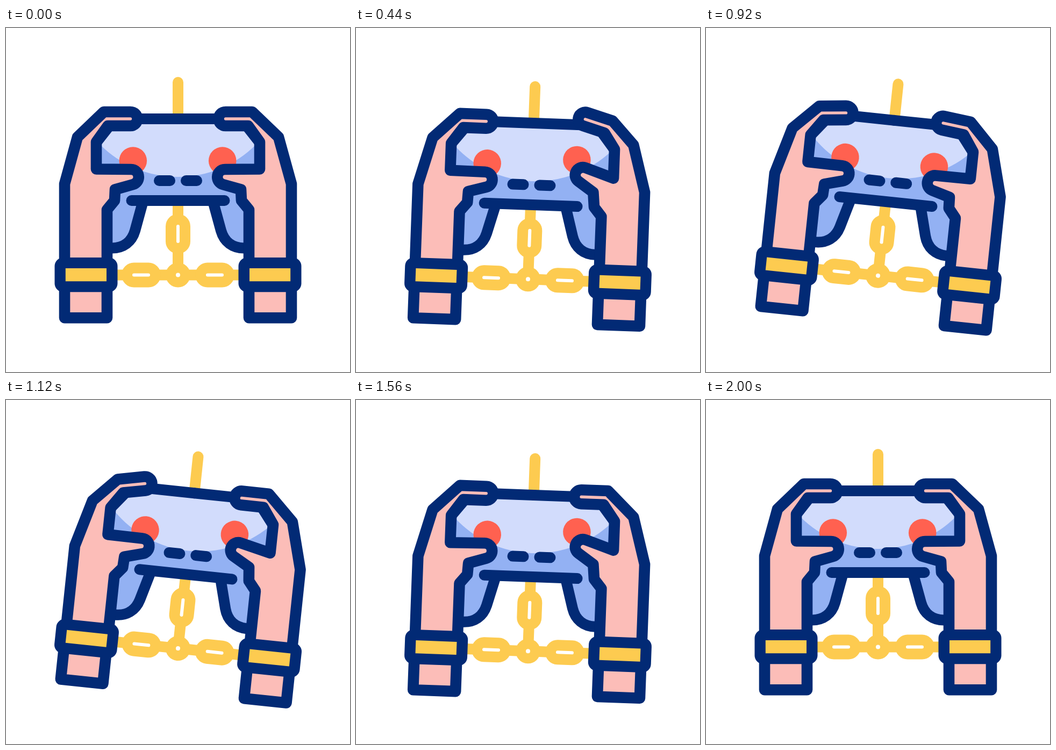
Recreate the animation shown at these times as an HTML page with a canvas. Size 640x640 px, loop 2040 ms.

```html
<!DOCTYPE html>
<html lang="en">
<head>
<meta charset="utf-8">
<title>Chained to the gamepad</title>
<style>
html, body { margin: 0; width: 100%; height: 100%; overflow: hidden; background: #fff; }
canvas { display: block; width: 640px; height: 640px; }
</style>
</head>
<body>
<canvas id="stage"></canvas>
<script>
const NAVY = '#022a75', PINK = '#fcbdb8', GOLD = '#fdcb50',
      RED = '#ff6150', LIGHT = '#d2dcfc', BLUE = '#93b1f3';
const LOOP = 2040, STEP = 40, CX = 320, CY = 459.5, DEG = Math.PI / 180;

const canvas = document.getElementById('stage');
const ctx = canvas.getContext('2d');
const dpr = window.devicePixelRatio || 1;
canvas.width = canvas.height = 640 * dpr;

const smooth = (t, a, b) => {
  const s = Math.min(1, Math.max(0, (t - a) / (b - a)));
  return s * s * (3 - 2 * s);
};
// Rise and fall lasting 400 ms, or any other half length
const pulse = (t, start, half = 200) =>
  smooth(t, start, start + half) - smooth(t, start + half, start + 2 * half);
const pulses = (t, starts) => starts.reduce((sum, s) => sum + pulse(t, s), 0);

function pose(t) {
  return {
    turn: 6 * DEG * (smooth(t, 200, 800) - smooth(t, 1200, 1800)),
    drop: 12 * (pulse(t, 200, 400) + pulse(t, 1000, 400)),
    left: { finger: pulses(t, [0, 600, 1000]), thumb: pulses(t, [0, 1200, 1600]), bend: 15 },
    right: { finger: pulses(t, [200, 600]), thumb: pulses(t, [200, 1000, 1400]), bend: 21 }
  };
}

function spin([x, y], [px, py], a) {
  const c = Math.cos(a), s = Math.sin(a), dx = x - px, dy = y - py;
  return [px + dx * c - dy * s, py + dx * s + dy * c];
}

function stroke(color, width = 20) {
  ctx.strokeStyle = color;
  ctx.lineWidth = width;
  ctx.stroke();
}

function fill(color) {
  ctx.fillStyle = color;
  ctx.fill();
}

function line(color, x1, y1, x2, y2) {
  ctx.beginPath();
  ctx.moveTo(x1, y1);
  ctx.lineTo(x2, y2);
  stroke(color);
}

function disc(color, x, y, r) {
  ctx.beginPath();
  ctx.arc(x, y, r, 0, 2 * Math.PI);
  fill(color);
}

function box(color, x, y, w, h, r = 0) {
  ctx.beginPath();
  ctx.roundRect(x, y, w, h, r);
  fill(color);
}

// Chain link: a stadium outline centred on x, y
function link(x, y, w, h) {
  ctx.beginPath();
  ctx.roundRect(x - w / 2, y - h / 2, w, h, Math.min(w, h) / 2);
  stroke(GOLD);
}

function mirrored(draw) {
  ctx.save();
  ctx.translate(640, 0);
  ctx.scale(-1, 1);
  draw();
  ctx.restore();
}

function chain() {
  line(GOLD, CX, 101, CX, 352);
  line(GOLD, CX, 412, CX, 442);
  link(CX, 383, 26, 54);
  const side = () => {
    line(GOLD, 197, CY, 222, CY);
    line(GOLD, 282, CY, 304, CY);
    link(251.5, CY, 53, 26);
  };
  side();
  mirrored(side);
  ctx.beginPath();
  ctx.arc(CX, CY, 13.5, 0, 2 * Math.PI);
  stroke(GOLD, 19);
}

function grip() {
  ctx.beginPath();
  ctx.moveTo(254.5, 324);
  ctx.lineTo(240, 377);
  ctx.bezierCurveTo(234, 398, 218, 409.5, 197, 409.5);
}

function gripFill() {
  grip();
  ctx.lineTo(190, 409.5);
  ctx.lineTo(190, 324);
  ctx.closePath();
  fill(BLUE);
  grip();
  stroke(NAVY);
}

function shoulder() {
  ctx.beginPath();
  ctx.moveTo(CX, 169);
  ctx.lineTo(232, 169);
  ctx.lineTo(194, 180);
  ctx.lineTo(168, 213);
  stroke(NAVY);
}

function gamepad(p) {
  gripFill();
  mirrored(gripFill);

  ctx.save();
  ctx.beginPath();
  [[232, 169], [408, 169], [446, 180], [472, 213], [472, 300], [445, 325],
   [195, 325], [168, 300], [168, 213], [194, 180]].forEach(q => ctx.lineTo(...q));
  ctx.closePath();
  fill(BLUE);
  ctx.clip();
  disc(LIGHT, CX, 72, 205);
  ctx.restore();

  disc(RED, 236.3, 247 - 14 * p.left.thumb, 25.8);
  disc(RED, 402.7, 247 - 14 * p.right.thumb, 25.8);
  shoulder();
  mirrored(shoulder);
  line(NAVY, 285, 284, 305, 284);
  line(NAVY, 335, 284, 355, 284);
  line(NAVY, 233.5, 321, 406.5, 321);
}

function hand({ finger, thumb, bend }) {
  const a = -18 * DEG * finger, b = -bend * DEG * thumb;
  const knuckle = q => spin(q, [190, 188], a);
  const base = q => spin(q, [183, 292], b);
  ctx.beginPath();
  ctx.moveTo(109, 539.3);
  ctx.lineTo(109, 290);
  ctx.lineTo(133, 203);
  ctx.lineTo(...knuckle([182, 156]));
  ctx.arc(...knuckle([231.5, 169]), 13, a - Math.PI / 2, a + Math.PI / 2);
  ctx.lineTo(...knuckle([189.5, 182]));
  ctx.lineTo(168, 212);
  ctx.lineTo(168, 262.5 + 4 * thumb);
  ctx.arc(...base([232.5, 277.3]), 14.3, b - Math.PI / 2, b + 75 * DEG);
  ctx.lineTo(...base([203, 300.5]));
  ctx.lineTo(202, 321);
  ctx.lineTo(188, 338);
  ctx.lineTo(188, 539.3);
  ctx.closePath();
  fill(PINK);
  stroke(NAVY, 20.6);

  box(NAVY, 90.5, 427, 117, 64.3, 16);
  box(GOLD, 110.8, 447, 76.2, 24.2);
}

function draw(t) {
  const p = pose(t);
  ctx.setTransform(dpr, 0, 0, dpr, 0, 0);
  ctx.fillStyle = '#fff';
  ctx.fillRect(0, 0, 640, 640);
  ctx.lineCap = ctx.lineJoin = 'round';
  ctx.translate(CX, CY + p.drop);
  ctx.rotate(p.turn);
  ctx.translate(-CX, -CY);
  chain();
  gamepad(p);
  hand(p.left);
  mirrored(() => hand(p.right));
}

function tick() {
  const t = performance.now() % LOOP;
  draw(Math.floor(t / STEP) * STEP);
  requestAnimationFrame(tick);
}
tick();
</script>
</body>
</html>
```
